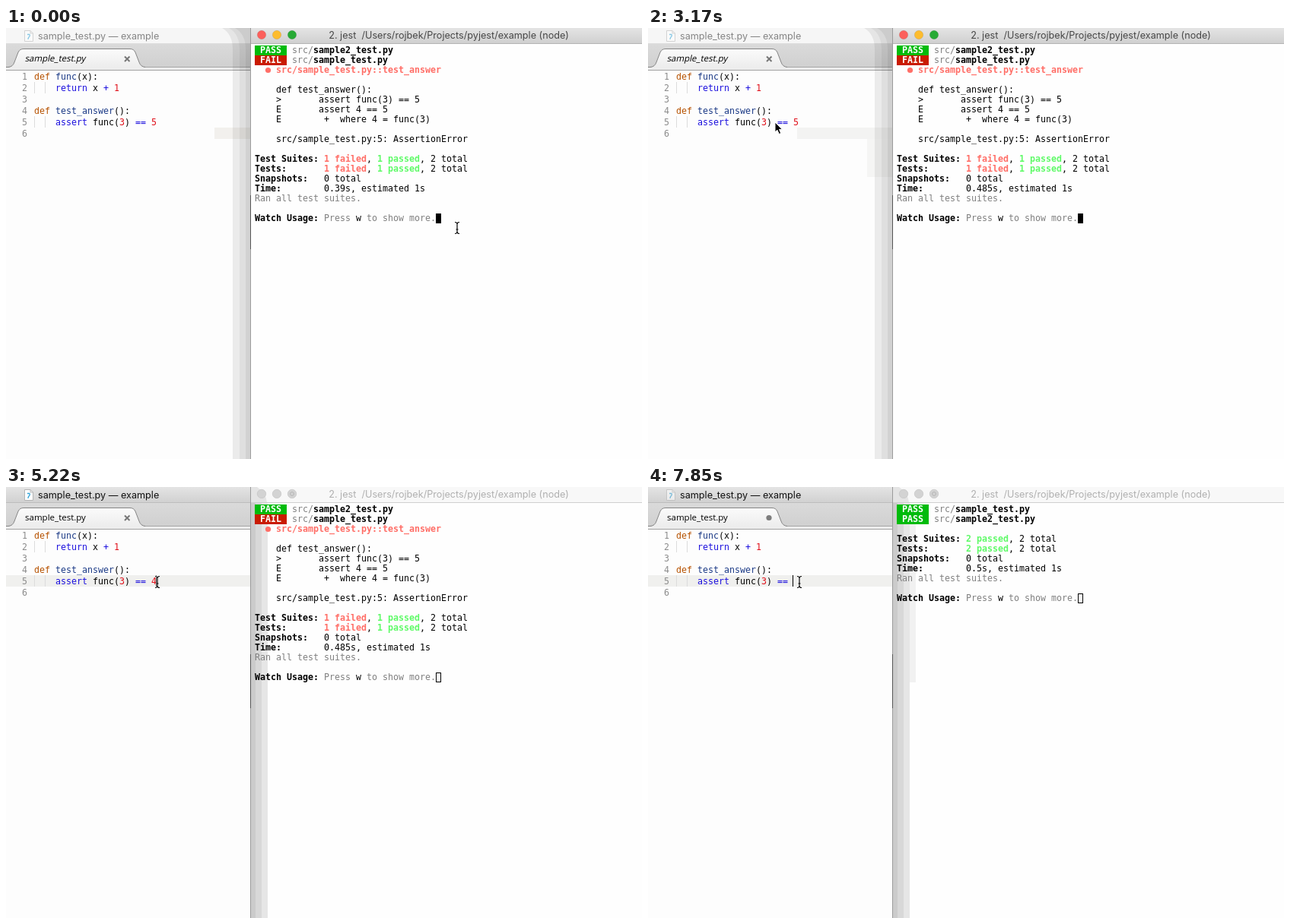
An HTML page for the animation above (8 s loop, 836 by 567 pixels).

```html
<!DOCTYPE html>
<html lang="en">
<head>
<meta charset="utf-8">
<title>Watch mode</title>
<style>
html, body { margin: 0; width: 100%; height: 100%; overflow: hidden; background: #fdfdfd; }
svg { display: block; }
text { white-space: pre; }
.mono { font: 11.63px "DejaVu Sans Mono", monospace; }
.title { font: 12.65px Inter, sans-serif; }
.tab { font: 11.5px "Open Sans", sans-serif; }
.b { font-weight: bold; }
.gray { fill: #7f7f7f; }
.red { fill: #ff6e67; font-weight: bold; }
.green { fill: #5ffa68; font-weight: bold; }
.badge { fill: #fff; font-weight: bold; }
.def { fill: #b65200; }
.name { fill: #1b3a86; }
.key { fill: #1c10de; }
.num { fill: #e0101a; }
.no { fill: #8c8c8c; }
</style>
</head>
<body>
<svg width="836" height="567" viewBox="0 0 836 567" xmlns="http://www.w3.org/2000/svg">
  <defs>
    <linearGradient id="active" x2="0" y2="1"><stop stop-color="#e4e4e4"/><stop offset="1" stop-color="#d0d0d0"/></linearGradient>
    <linearGradient id="tabbar" x2="0" y2="1"><stop stop-color="#dadada"/><stop offset="1" stop-color="#d0d0d0"/></linearGradient>
    <linearGradient id="tabfill" x2="0" y2="1"><stop stop-color="#fbfbfb"/><stop offset="1" stop-color="#ececec"/></linearGradient>
  </defs>
  <g id="editor"></g>
  <g id="terminal"></g>
  <g id="mouse"></g>
</svg>
<script>
const LOOP = 8000, CELL = 7;
const layer = id => document.getElementById(id);
const rect = (x, y, w, h, fill, extra = '') =>
  `<rect x="${x}" y="${y}" width="${w}" height="${h}" fill="${fill}" ${extra}/>`;
const text = (x, y, str, cls, extra = '') => `<text x="${x}" y="${y}" class="${cls}" ${extra}>${str.replace(/>/g, '&gt;')}</text>`;
const path = (d, fill, extra = '') => `<path d="${d}" fill="${fill}" ${extra}/>`;
const current = (steps, t) => steps.filter(s => s[0] <= t).pop()[1];

// Lays out [class, string] runs on the character grid.
function runs(x, y, parts) {
  let col = 0;
  return parts.map(([cls, str]) => {
    const out = str.trim() ? text(x + col * CELL, y, str, 'mono ' + cls) : '';
    col += str.length;
    return out;
  }).join('');
}

// Terminal screens: a list of rows plus the cursor cell.
const BADGE = { PASS: '#00bb0c', FAIL: '#c91b00', RUNS: '#c7c400' };
const file = (status, name) => [['badge', ` ${status} `], ['gray', ' src/'], ['b', name]];
const one = 'sample_test.py', two = 'sample2_test.py';
const plain = str => [['', str]];

function summary(counts, time) {
  const total = label => [['b', label.padEnd(13)], ...counts, ['', ', 2 total']];
  return [
    [], total('Test Suites:'), total('Tests:'),
    [['b', 'Snapshots:   '], ['', '0 total']],
    [['b', 'Time:        '], ['', time + ', estimated 1s']],
    [['gray', 'Ran all test suites.']], [],
    [['b', 'Watch Usage:'], ['gray', ' Press '], ['', 'w'], ['gray', ' to show more.']]
  ];
}
const failure = [
  file('PASS', two), file('FAIL', one),
  [['red', '  '], ['dot', '●'], ['red', ' src/sample_test.py::test_answer']], [],
  plain('    def test_answer():'),
  plain('    >       assert func(3) == 5'),
  plain('    E       assert 4 == 5'),
  plain('    E        +  where 4 = func(3)'), [],
  plain('    src/sample_test.py:5: AssertionError')
];
const failed = time => ({
  rows: [...failure, ...summary([['red', '1 failed'], ['', ', '], ['green', '1 passed']], time)], col: 34, row: 17
});
const running = { rows: [[], file('RUNS', one), file('RUNS', two)], col: 0, row: 3 };
const partial = (done, pending) => ({ rows: [file('PASS', done), [], file('RUNS', pending)], col: 0, row: 3 });
const passed = {
  rows: [file('PASS', one), file('PASS', two), ...summary([['green', '2 passed']], '0.5s')], col: 34, row: 9
};
const screens = [
  [0, failed('0.39s')], [830, running], [1280, partial(two, one)],
  [1340, { rows: failure, col: 0, row: 11 }], [1390, failed('0.485s')],
  [5310, running], [5810, partial(one, two)], [5900, passed]
];

function drawTerminal(t) {
  const focused = t < 3740, editing = t >= 3680, screen = current(screens, t);
  let out = rect(322, 0, 514, 567, '#fefefe');
  if (editing) {
    if (t >= 5310) out += path('M344 21Q352 30 352 50V257H344Z', '#f1f1f1');
    out += rect(336, 21, 8, 546, '#e6e6e6') + rect(328, 21, 8, 546, '#d8d8d8') + rect(322, 21, 6, 546, '#cbcbcb');
  }
  out += rect(322, 0, 514, 20, focused ? 'url(#active)' : '#f8f8f8') + rect(322, 20, 514, 1, focused ? '#b4b4b4' : '#cfcfcf');
  if (!focused) out += path('M322 0H330Q342 8 343 20H322Z', '#000', 'opacity=".08"');
  ['#fc605c', '#fdbc2e', '#27aa35'].forEach((color, i) => {
    const x = 336 + i * 20;
    out += `<circle cx="${x}" cy="9" r="5.7" fill="${focused ? color : '#d3d3d3'}" stroke="${focused ? '#0002' : '#c4c4c4'}" stroke-width=".7"/>`;
    if (i === 2 && !focused) out += `<circle cx="${x}" cy="9" r="2.4" fill="none" stroke="#b5b5b5"/>`;
  });
  out += text(582, 14, '2. jest  /Users/rojbek/Projects/pyjest/example (node)', 'title',
    `text-anchor="middle" fill="${focused ? '#474747' : '#b0b0b0'}"`);
  screen.rows.forEach((parts, row) => {
    const y = 23 + row * 13;
    if (parts[0] && parts[0][0] === 'badge') out += rect(327, y, 42, 13, BADGE[parts[0][1].trim()]);
    const dot = parts.some(p => p[0] === 'dot');
    if (dot) out += `<circle cx="344.5" cy="${y + 6.5}" r="3.6" fill="#ff6e67"/>`;
    out += runs(327, y + 10, dot ? parts.map(p => p[0] === 'dot' ? ['', ' '] : p) : parts);
  });
  const x = 327 + screen.col * CELL, y = 23 + screen.row * 13;
  out += focused ? rect(x, y, 7, 13, '#000')
    : rect(x + .5, y + .5, 6, 12, 'none', 'stroke="#000"');
  return out + rect(321, 0, 1, 567, '#9b9b9b') + rect(321, 220, 1, 71, '#555');
}

// Caret opacity: short fades in and out while idle.
const fade = (t, from, to) => Math.min(1, Math.max(0, (t - from) / (to - from)));
function caretAlpha(t) {
  if (t < 5750 || t >= 7850) return 1;
  if (t < 6200) return 0;
  if (t < 6840) return .34 + .66 * fade(t, 6200, 6310);
  if (t < 7200) return .5 - .5 * fade(t, 6840, 6900);
  return t < 7790 ? .34 + .66 * fade(t, 7200, 7310) : .5;
}

function drawEditor(t) {
  const focused = t >= 3680, edited = t >= 4510;
  const dirty = t >= 4510 && t < 5170 || t >= 7850;
  const digit = t < 4510 ? '5' : t < 4810 || t >= 7850 ? '' : '4';
  const line = t < 4010 ? 6 : 5;
  let out = rect(0, 0, 322, 567, '#fdfdfd');
  if (focused) out += rect(0, 41 + line * 15, 321, 15, '#f0f0ee');
  else out += t < 2400 ? rect(274, 131, 47, 15, '#f2f0ed')
    : rect(196, 131, 125, 15, '#f3f3f2') + rect(288, 146, 33, 50, '#f5f5f4');

  out += rect(0, 0, 321, 21, focused ? 'url(#active)' : '#f6f6f6');
  out += rect(0, 21, 321, 31, 'url(#tabbar)') + rect(0, 20, 321, 1, focused ? '#bdbdbd' : '#dddddd');
  out += rect(0, 52, 321, 3, '#ededed') + rect(0, 51, 321, 1, '#a6a6a6');
  out += path('M0 51.5H3Q9 51 11 45L16 32Q18 27.5 23 27.5H163Q168 27.5 170 32L175 45Q177 51 183 51.5V53H0Z',
    'url(#tabfill)') + path('M0 51.5H3Q9 51 11 45L16 32Q18 27.5 23 27.5H163Q168 27.5 170 32L175 45Q177 51 183 51.5',
    'none', 'stroke="#858585"');
  out += rect(0, 55, 321, 1, '#a2a2a2');

  const pale = !focused || dirty;
  out += `<g opacity="${pale ? .55 : 1}">` + path('M24.5 3.5H32L35.5 7V17.5H24.5Z', '#fff', 'stroke="#b5b5b5"')
    + path('M32 3.5V7H35.5', 'none', 'stroke="#b5b5b5"')
    + path('M28 8.5H31Q32 10 30.5 11.5T29 15', 'none', 'stroke="#35a5d8" stroke-width="1.3"') + '</g>';
  out += text(42, 15, 'sample_test.py — example', 'title', `fill="${focused ? '#111' : '#858585'}"`);
  out += text(25, 44, one, 'tab', edited ? '' : 'transform="translate(9 0) skewX(-12)"');
  out += dirty ? '<circle cx="159" cy="40.500" r="3.6" fill="#7d7d7d"/>'
    : path('M156 37.500l6.500 6.500m0-6.500l-6.500 6.500', 'none', 'stroke="#777" stroke-width="2"');

  const code = [
    [['def', 'def '], ['name', 'func'], ['', '(x):']],
    [['key', '    return'], ['', ' x '], ['key', '+'], ['num', ' 1']],
    [],
    [['def', 'def '], ['name', 'test_answer'], ['', '():']],
    [['key', '    assert'], ['', ' func('], ['num', '3'], ['', ') '], ['key', '== '], ['num', digit]],
    []
  ];
  code.forEach((parts, i) => {
    const y = 68 + i * 15;
    out += text(21, y, String(i + 1), 'mono no') + runs(37, y, parts);
    if (i === 1 || i === 4) out += rect(37, y - 12, 1, 15, '#dcdcdc') + rect(51, y - 12, 1, 15, '#dcdcdc');
  });

  if (focused) {
    const x = line === 6 ? 36 : digit ? 197 : 190;
    out += rect(x, 41 + line * 15, 1, 15, '#000', `opacity="${caretAlpha(t)}"`);
  } else {
    // Drop shadow of the front window.
    [[298, .07], [307, .05], [315, .06]].forEach(([x, alpha]) => {
      out += path(`M${x - 14} 0Q${x} 8 ${x} 28V567H321V0Z`, '#000', `opacity="${alpha}"`);
    });
  }
  return out;
}

const pointer = [
  [0, [593, 263]], [2290, [540, 244]], [2350, [390, 192]], [2400, [240, 140]], [2460, [176, 119]],
  [3060, [174, 120]], [3120, [170, 122]], [3170, [167, 124]],
  [3740, [170, 124]], [3800, [181, 125]], [3860, [193, 125]], [3940, [199, 125]]
];

function drawMouse(t) {
  const [x, y] = current(pointer, t);
  const arrow = t >= 2400 && t < 3800;
  const shape = arrow ? path('M0 0V13L3 10.300L5.300 15.500L7.700 14.400L5.500 9.400H9.500Z', '#000', 'stroke="#fff" stroke-width="1"')
    : ['#fff', '#000'].map((color, i) => path('M-3-7.500Q0-7.500 0-5Q0-7.500 3-7.500M0-5V5M-3 7.500Q0 7.500 0 5Q0 7.500 3 7.500M-1.500 2H1.500',
      'none', `stroke="${color}" stroke-width="${i ? 1.2 : 2.6}"`)).join('');
  return `<g transform="translate(${x} ${y})">${shape}</g>`;
}

const views = [['editor', drawEditor], ['terminal', drawTerminal], ['mouse', drawMouse]];
const shown = {};
function render(t) {
  for (const [id, draw] of views) {
    const markup = draw(t);
    if (shown[id] !== markup) layer(id).innerHTML = shown[id] = markup;
  }
}

const start = performance.now();
function tick() {
  render((performance.now() - start) % LOOP);
  requestAnimationFrame(tick);
}
tick();
</script>
</body>
</html>
```
